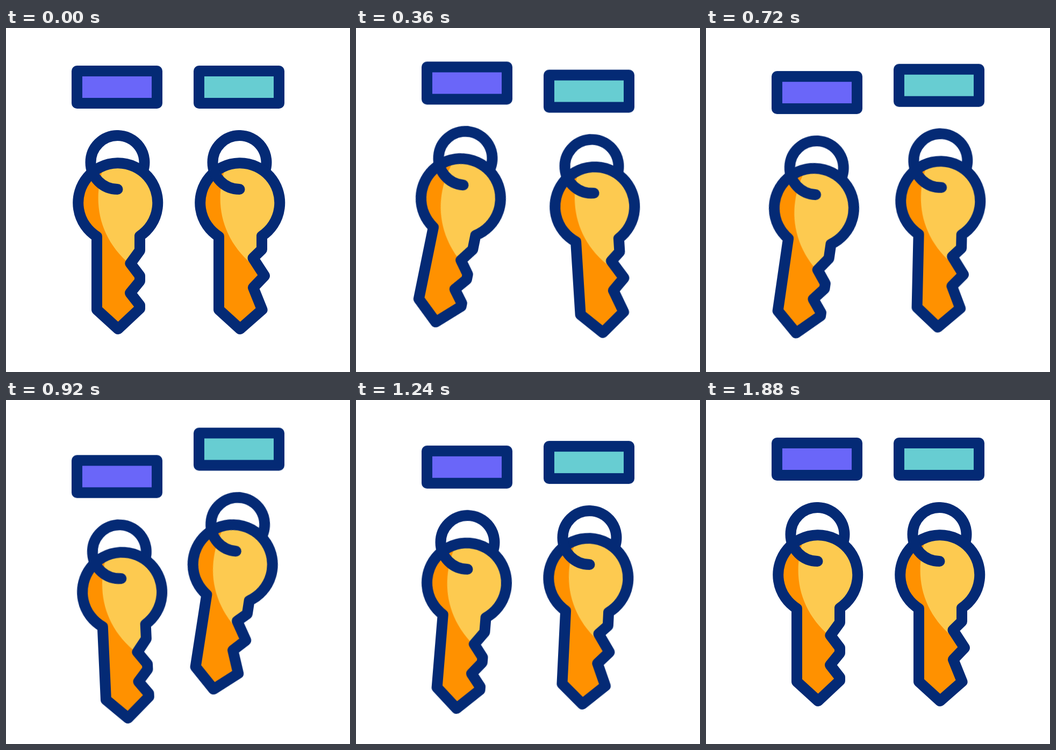
Animation of 640 by 640 pixels, one loop 2000 ms. Source, as an HTML page without scripts:

```html
<!DOCTYPE html>
<html lang="en">
<head>
<meta charset="utf-8">
<title>Swinging keys</title>
<style>
  html, body { margin: 0; width: 100%; height: 100%; overflow: hidden; background: #fff; }
  svg { display: block; width: 100vw; height: 100vh; }

  .line { fill: none; stroke: #042a75; stroke-width: 20; stroke-linecap: round; stroke-linejoin: round; }
  .dark { fill: #ff9100; }
  .light { fill: #fdca50; }

  .bob, .ring, .key { animation: move 2s infinite; }
  .ring { transform-origin: 207.5px 200px; }
  .left .key { transform-origin: 207.5px 298px; }
  .right .key { transform-origin: 207.5px 266px; }

  /* Poses are held for 40 ms each */
  @keyframes move {
    0%, 4% { transform: none; animation-timing-function: steps(1); }
    6% { transform: var(--a); animation-timing-function: steps(10); }
    26% { transform: var(--b); animation-timing-function: steps(1); }
    28% { transform: var(--c); animation-timing-function: steps(8); }
    44% { transform: var(--d); animation-timing-function: steps(1); }
    46% { transform: var(--e); animation-timing-function: steps(8); }
    62% { transform: var(--f); animation-timing-function: steps(4); }
    70% { transform: var(--g); animation-timing-function: steps(4); }
    78% { transform: var(--h); animation-timing-function: steps(8); }
    94%, 100% { transform: none; }
  }

  .left .bob {
    --a: translateY(-.6px); --b: translateY(-12.1px); --c: translateY(-13.2px); --d: translateY(33.4px);
    --e: translateY(32.4px); --f: translateY(14.8px); --g: translateY(7px); --h: translateY(4.9px);
  }
  .left .ring {
    --a: rotate(.35deg); --b: rotate(7.4deg); --c: rotate(8deg); --d: rotate(-4.1deg);
    --e: rotate(-3.9deg); --f: rotate(0deg); --g: rotate(2.2deg); --h: rotate(1.5deg);
  }
  .left .key {
    --a: rotate(.4deg); --b: rotate(11.3deg); --c: rotate(11.4deg); --d: rotate(1.2deg);
    --e: rotate(1.3deg); --f: rotate(4.7deg); --g: rotate(5.8deg); --h: rotate(3.7deg);
  }
  .right .bob {
    --a: translateY(.6px); --b: translateY(12.2px); --c: translateY(13.2px); --d: translateY(-19.7px);
    --e: translateY(-18.5px); --f: translateY(6.1px); --g: translateY(17.8px); --h: translateY(12.2px);
  }
  .right .ring {
    --a: rotate(-.35deg); --b: rotate(-7.5deg); --c: rotate(-8.2deg); --d: rotate(4deg);
    --e: rotate(3.8deg); --f: rotate(0deg); --g: rotate(-2.3deg); --h: rotate(-1.8deg);
  }
  .right .key {
    --a: rotate(.05deg); --b: rotate(1.7deg); --c: rotate(1.8deg); --d: rotate(5deg);
    --e: rotate(5deg); --f: rotate(2.8deg); --g: rotate(2.3deg); --h: rotate(1.9deg);
  }
</style>
</head>
<body>
<svg viewBox="0 0 640 640">
  <defs>
    <rect id="tag" class="line" x="132" y="80" width="149" height="60"/>
    <path id="back" class="line" d="M207.5 200A50 50 0 0 1 254.5 267"/>
    <path id="front" class="line" d="M207.5 300A50 50 0 0 1 207.5 200"/>
    <path id="shine" class="light" d="M183 255C159 320 172 390 231 440H300V240H183Z"/>
    <path id="keyL" d="M169 388A74 74 0 1 1 249 387V414L231.5 438 249 461V471L231 493 249 516V522L208.5 560 169 524Z"/>
    <path id="keyR" d="M169 388A74 74 0 1 1 249 387V412L232.5 428 254 461 233 483 249.5 524 208.5 560 169 524Z"/>
    <clipPath id="clipL"><use href="#keyL"/></clipPath>
    <clipPath id="clipR"><use href="#keyR"/></clipPath>
  </defs>

  <g class="left">
    <g class="bob">
      <g fill="#6a66f9"><rect x="132" y="80" width="149" height="60"/></g>
      <use href="#tag"/>
      <g class="ring">
        <use href="#back"/>
        <g class="key">
          <use href="#keyL" class="dark"/>
          <g clip-path="url(#clipL)"><use href="#shine"/></g>
          <use href="#keyL" class="line"/>
        </g>
        <use href="#front"/>
      </g>
    </g>
  </g>

  <g class="right" transform="translate(227)">
    <g class="bob">
      <g fill="#67cdd2"><rect x="132" y="80" width="149" height="60"/></g>
      <use href="#tag"/>
      <g class="ring">
        <use href="#back"/>
        <g class="key">
          <use href="#keyR" class="dark"/>
          <g clip-path="url(#clipR)"><use href="#shine"/></g>
          <use href="#keyR" class="line"/>
        </g>
        <use href="#front"/>
      </g>
    </g>
  </g>
</svg>
</body>
</html>
```
